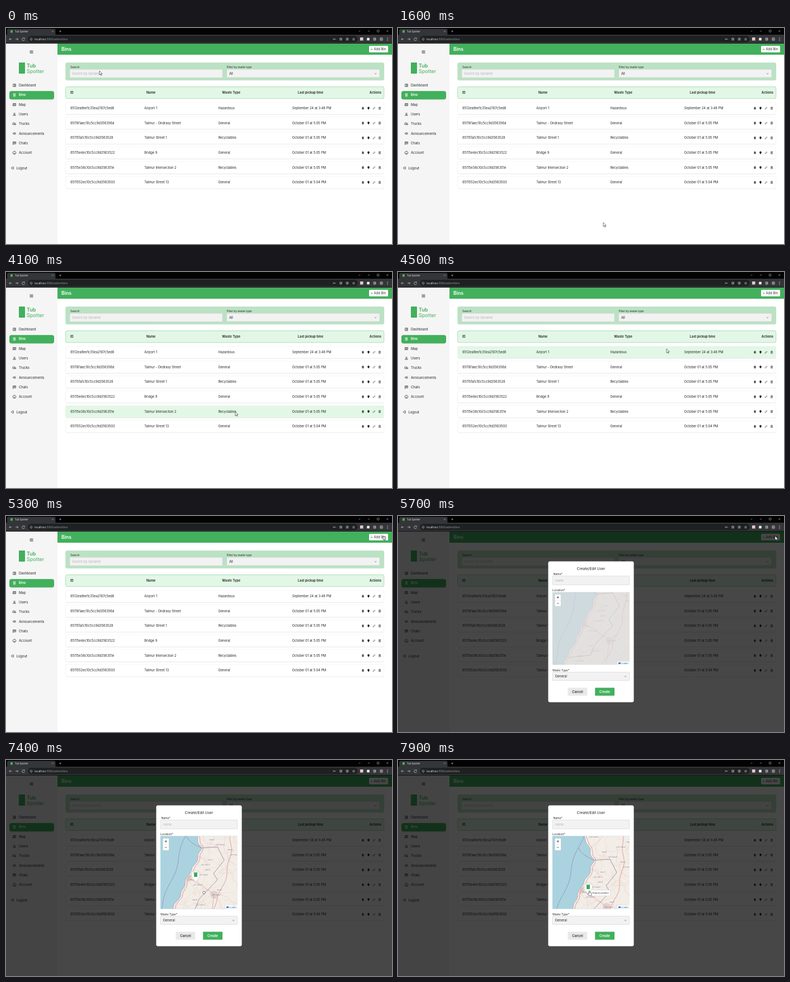
An HTML page for the animation above (8000 ms loop, 690 by 388 pixels).

```html
<!DOCTYPE html>
<html lang="en">
<head>
<meta charset="utf-8">
<title>Bins</title>
<style>
html, body { margin: 0; width: 100%; height: 100%; overflow: hidden; background: #fff; }
svg { display: block; width: 100vw; height: 100vh; font-family: Inter, sans-serif; }
text { white-space: pre; }
.os { font-family: "Open Sans", sans-serif; }
.arial { font-family: "Liberation Sans", Arial, sans-serif; }
.arabic { font-family: "DejaVu Sans", sans-serif; }
</style>
</head>
<body>
<svg id="stage" viewBox="0 0 690 388"></svg>
<script>
const GREEN = '#42b05c', INK = '#222', GREY = '#b5b5b5', PALE = '#ddd';
const STEP = 100, LOOP = 8000;

const text = (x, y, s, size = 5.75, fill = INK, attrs = '') =>
  `<text x="${x}" y="${y}" font-size="${size}" fill="${fill}" ${attrs}>${s}</text>`;
const bold = (x, y, s, size, fill, attrs = '') => text(x, y, s, size, fill, 'font-weight="600" ' + attrs);
const rect = (x, y, w, h, fill, rx = 0, attrs = '') =>
  `<rect x="${x}" y="${y}" width="${w}" height="${h}" rx="${rx}" fill="${fill}" ${attrs}/>`;
const line = (d, stroke, width = .7) => `<path d="${d}" fill="none" stroke="${stroke}" stroke-width="${width}"/>`;
const dot = (x, y, r, fill) => `<circle cx="${x}" cy="${y}" r="${r}" fill="${fill}"/>`;
const border = (color, width = .5) => `stroke="${color}" stroke-width="${width}"`;
const CENTER = 'text-anchor="middle"';

// Icons live on a 24-unit grid and are placed by their centre.
const ICONS = {
  board: 'M4 4h16v16H4zM12 4v16M12 12h8',
  bin: 'M4 6h16M9 6V3h6v3M6 6v15h12V6M10 10v7M14 10v7',
  map: 'M3 6l6-2 6 2 6-2v14l-6 2-6-2-6 2zM9 4v14M15 6v14',
  user: 'M12 4a4 4 0 1 0 .01 0M4 20c0-8 16-8 16 0z',
  truck: 'M2 6h12v10H2zM14 9h4l4 4v3h-8M6 16v3M18 16v3',
  horn: 'M4 9v6h5l6 4V5L9 9zM20 8v8',
  chat: 'M3 4h18v13H8l-5 4zM7 8h10M7 12h10',
  account: 'M12 2a10 10 0 1 0 .01 0M12 7v4M7 17h10',
  logout: 'M9 4h11v16H9M15 12H3M7 8l-4 4 4 4',
  pin: 'M12 22S5 15 5 9a7 7 0 0 1 14 0c0 6-7 13-7 13z',
  pencil: 'M4 20l1-5L16 4l4 4L9 19z',
  key: 'M7 8a4 4 0 1 0 .01 0M11 12h11v4',
  star: 'M12 3l3 6 6 1-5 5 1 6-5-3-5 3 1-6-5-5 6-1z',
  down: 'M5 9l7 7 7-7',
  box: 'M4 4h16v16H4z',
  minus: 'M4 12h16',
  plus: 'M12 4v16M4 12h16',
  cross: 'M5 5l14 14M19 5L5 19',
  back: 'M21 12H4M11 5l-7 7 7 7',
  reload: 'M19 7a9 9 0 1 0 2 7M20 2v6h-6'
};
const icon = (name, x, y, size, color, fill = 'none') =>
  `<path d="${ICONS[name]}" transform="translate(${x - size / 2} ${y - size / 2}) scale(${size / 24})"
    fill="${fill}" stroke="${color}" stroke-width="2.4"/>`;
const iconRow = (names, x, gap, y, size) => names.map((name, i) => icon(name, x + i * gap, y, size, PALE)).join('');

function browser() {
  return rect(0, 0, 690, 28, '#030303') + rect(2, 1.5, 86.5, 14, '#343538', 2.5) +
    rect(0, 12, 690, 15.5, '#343538') + rect(39, 14, 590, 11.5, '#1f2022', 5.7) +
    rect(8, 4, 4, 4.5, GREEN) + text(16, 8, 'Tub Spotter', 4.4, '#e8e8e8', 'class="os"') +
    icon('cross', 83.5, 6, 4.5, PALE) + icon('plus', 97, 6, 5.5, PALE) +
    iconRow(['down', 'minus', 'box', 'cross'], 632, 16.6, 5.5, 5) +
    icon('back', 8, 20, 6.5, PALE) + icon('back', 19.5, 20, -6.5, PALE) +
    icon('reload', 31, 20, 6.5, PALE) + icon('account', 45, 20, 5, PALE) +
    text(51, 21.7, 'localhost<tspan fill="#9aa0a6">:3000/admin/bins</tspan>', 4.8, '#eee', 'class="os"') +
    iconRow(['key', 'board', 'board', 'star'], 587, 11.5, 20, 5.5) +
    rect(633, 17, 5.5, 5.5, '#e6c9c9') + icon('box', 647.5, 20, 6, '#eee', '#eee') +
    icon('board', 659, 20, 6, '#eee') + dot(671, 20, 3.2, '#837b80') +
    [-1, 0, 1].map(i => dot(682, 20 + i * 2.4, .65, PALE)).join('');
}

function sidebar() {
  const items = { board: 'Dashboard', bin: 'Bins', map: 'Map', user: 'Users',
    truck: 'Trucks', horn: 'Announcements', chat: 'Chats', account: 'Account' };
  return rect(0, 27.5, 92, 361, '#f5f5f5') +
    line('M42.5 41h6m-6 2h6m-6 2h6', INK, .8) + rect(23, 62, 11, 20, GREEN, 1) +
    bold(37, 70.5, 'Tub', 9, GREEN) + text(37, 81, 'Spotter', 9, GREEN) +
    rect(6, 113.3, 80, 15, GREEN, 4, 'filter="url(#soft)"') +
    Object.entries(items).map(([name, label], i) => {
      const y = 103 + i * 17.3, on = label === 'Bins', color = on ? '#fff' : INK;
      return icon(name, 15, y, 6.8, color) + (on ? bold : text)(23, y + 2.1, label, 5.9, color);
    }).join('') +
    icon('logout', 11.5, 251.5, 6, INK) + text(18.5, 253.6, 'Logout', 5.9);
}

const ROWS = [
  ['6512ea9ee1c35ea2107c5ed8', 'Airport 1', 'Hazardous', 'September 24 at 3:48 PM'],
  ['651181aec10c5cc9d356356d', 'Talmur - Ondrasy Street', 'General', 'October 01 at 5:05 PM'],
  ['65115fa1c10c5cc9d3563528', 'Talmur Street 1', 'Recyclables', 'October 01 at 5:05 PM'],
  ['65115e4ec10c5cc9d3563522', 'Bridge 9', 'General', 'October 01 at 5:05 PM'],
  ['65115e38c10c5cc9d356351e', 'Talmur Intersection 2', 'Recyclables', 'October 01 at 5:05 PM'],
  ['6511552ec10c5cc9d3563503', 'Talmur Street 13', 'General', 'October 01 at 5:04 PM']
];
const rowTop = i => 133.4 + i * 26.65, ROW_H = 21.4;

function table() {
  const heads = ['Name', 'Waste Type', 'Last pickup time'];
  return rect(106.7, 105.6, 569, 21, '#e2f7e6', 2, border('#86cb98', .6)) +
    bold(115, 118, 'ID', 5.75) + bold(671, 118, 'Actions', 5.75, INK, 'text-anchor="end"') +
    heads.map((s, i) => bold(251 + i * 135.3, 118, s, 5.75)).join('') +
    ROWS.map((cells, i) => {
      const y = rowTop(i) + 10.7;
      return rect(106.7, rowTop(i), 569, ROW_H, '#fff', 2, `class="row" filter="url(#soft)" ${border('#e9eeea', .4)}`) +
        cells.map((s, c) => text(115.2 + c * 132.1, y + 2, s)).join('') +
        icon('bin', 638, y, 5.2, '#333', '#777') + icon('pin', 648, y, 5.4, INK, INK) +
        icon('pencil', 658, y, 5.6, '#333') + icon('bin', 668, y, 5.8, '#333');
    }).join('');
}

const field = (x, y, w, h) => rect(x, y, w, h, '#f2f2f2', 1, border('#c9c9c9'));

function page() {
  return rect(92, 27.5, 598, 20.5, GREEN) + bold(99, 41, 'Bins', 8.7, '#fff') +
    rect(649, 32, 34, 11.7, '#fff', 1.5) + text(652, 40, '+ Add Bin', 5.9, '#333') +
    rect(106.7, 62.5, 569, 31.3, '#bbe2c4', 2.5, border('#a8d5b3')) +
    text(115, 72, 'Search', 4.95) + text(394.5, 72.4, 'Filter by waste type', 4.85) +
    field(114, 74.3, 273, 15) + field(394.5, 74.3, 273.5, 14.6) +
    text(118, 84, 'Search by id/name', 5.8, GREY) + text(399, 83.7, 'All') +
    icon('down', 660.5, 81.8, 5.5, INK) + table();
}

function mapArt() {
  let seed = 11;
  const rnd = (a, b) => a + (b - a) * ((seed = seed * 16807 % 2147483647) / 2147483647);
  const TOP = 100, BOTTOM = 300;
  const coast = y => 350 - .47 * Math.abs(y - 158) + 1.5 * Math.sin(y / 3.5) + 1.5 * Math.sin(y / 9);
  const seaBorder = y => 322 - .335 * (y - 136) + 3 * Math.sin(y / 14);
  const curve = (fx, gap) => {
    let d = '';
    for (let y = TOP; y <= BOTTOM; y += gap) d += `${d ? 'L' : 'M'}${fx(y).toFixed(1)} ${y}`;
    return d;
  };
  const walk = (x, y, angle, steps) => {
    let d = `M${x} ${y}`;
    for (let k = 0; k < steps; k++) {
      angle += rnd(-.7, .7);
      d += `l${(4 * Math.cos(angle)).toFixed(1)} ${(4 * Math.sin(angle)).toFixed(1)}`;
    }
    return d;
  };
  const shore = curve(coast, 2);

  let roads = '', labels = '';
  for (let i = 0; i < 150; i++)
    roads += line(walk(rnd(290, 430), rnd(TOP, BOTTOM), rnd(0, 6.3), 9), ['#eed0b5', '#e9b5b0', '#dcd0cc', '#e8ddd0'][i % 4], .4);
  for (let y = TOP + 8; y < BOTTOM; y += 9)
    labels += text(coast(y) + rnd(12, 80), y, y % 2 ? 'المنطقة الأولى' : 'المنطقة', 2.8, '#806b92', `class="arabic" ${CENTER}`);

  return rect(240, 90, 200, 220, '#aad3df') +
    `<clipPath id="land"><path d="${shore}H450V${TOP}z"/></clipPath><g clip-path="url(#land)">` +
    rect(240, 90, 220, 220, '#f2ede7') + dot(326, 212, 6, '#ddd3d1') + dot(372, 242, 7, '#ddd3d1') + roads +
    line(curve(y => coast(y) + 4, 7), '#df7f86', .7) +
    line(curve(y => 402 - .0022 * (y - 145) ** 2 + 2 * Math.sin(y / 8), 7), '#df7f86', .7) +
    line('M326 212L350 225 372 242 364 300', '#e08e84', .6) + '</g>' +
    line(shore, '#9b8fae', .6) + line(curve(seaBorder, 4), '#8f86b0', .7) +
    line('M322 136Q327 149 350 158L378 156 390 180 371 204 378 215 345 250 338 268 300 272', '#a793ac', 1) + labels;
}

function modal() {
  return rect(0, 27.5, 690, 361, '#000', 0, 'opacity=".72"') +
    rect(268.5, 81.5, 153, 253, '#fff', 3) +
    text(345, 96.7, 'Create/Edit User', 6.5, INK, CENTER) +
    text(277.5, 106, 'Name*', 5) + field(276.2, 107.7, 137.6, 16) + text(281, 117.5, 'name', 5.75, GREY) +
    text(276, 134.7, 'Location*', 5) +
    `<g clip-path="url(#mapBox)">${rect(276, 136.5, 138, 131, PALE)}<g id="map">${mapArt()}</g>
      <g id="marker"><path d="M0 0C-3-6-7.5-9-7.5-14a7.5 7.5 0 0 1 15 0C7.5-9 3-6 0 0z" fill="#fff" ${border('#aaa', .4)}/>
      ${rect(-3, -17.5, 6, 7.5, GREEN, .7)}${line('M-3.8-18H3.8M-1-16v4.5M1-16v4.5', '#2d9650')}</g></g>` +
    rect(280.2, 140.6, 11.3, 22, '#fff', 1.4, border(GREY)) + line('M280.2 151.6h11.3', '#ccc', .4) +
    icon('plus', 285.8, 146.2, 6.5, '#111') + icon('minus', 285.8, 157, 6, '#111') +
    rect(392, 261.6, 22, 5.8, '#fff', 0, 'opacity=".8"') + rect(394, 263, 4, 3, '#4c7be1') +
    text(399, 266, 'Leaflet', 4.2, '#0078a8', 'class="arial"') +
    text(276, 279, 'Waste Type*', 5) + field(276.2, 280.5, 137.6, 15) + text(280.7, 290, 'General') +
    icon('down', 406.5, 288, 5.5, INK) +
    rect(303.5, 308.6, 34.8, 14.2, '#e9e9e9', 1) + text(321, 317.8, 'Cancel', 5.9, INK, CENTER + ' font-weight="500"') +
    rect(352.2, 308.6, 34.8, 14.2, GREEN, 1) + bold(369.6, 317.8, 'Create', 5.9, '#fff', CENTER);
}

const skin = border(INK, .6) + ' fill="#fff" stroke-linejoin="round"';
const cursors =
  `<g id="tip">${rect(2.5, -4.5, 35, 10.5, '#fff', 1, border('#bbb', .4))}${text(5.4, 2.2, 'Drag to position', 4.2, INK, 'class="arial"')}</g>
   <path id="arrow" d="M0 0V7.2L1.7 5.6 2.8 8.2 4 7.7 2.9 5.2H5.2z" ${skin}/>
   <circle id="fist" r="2.3" ${skin}/>
   <path id="hand" d="M-.9-2.5q.9-1.1 1.8 0V.3q2.6.1 3 1.3V4q-.5 1.4-1 1.9H-.6L-3 2.4q.4-1.2 2.1 0z" ${skin}/>`;

const stage = document.getElementById('stage');
stage.innerHTML = `<defs>
  <filter id="soft" x="-5%" y="-20%" width="110%" height="150%"><feDropShadow dx="0" dy=".5" stdDeviation=".6" flood-opacity=".16"/></filter>
  <clipPath id="mapBox">${rect(276, 136.5, 138, 131, '#000')}</clipPath></defs>` +
  rect(0, 0, 690, 388, '#fff') + page() + sidebar() + browser() +
  `<g id="modal">${modal()}</g><g id="cursor">${cursors}</g>`;

const el = Object.fromEntries([...stage.querySelectorAll('[id]')].map(n => [n.id, n]));
const rows = [...stage.querySelectorAll('.row')];

// The pointer rests between moves; bend pushes the middle of a move off its straight line.
const HOME = [167, 77];
const MOVES = [
  { from: 0, to: 400, end: [434, 338], bend: [0, -25] },
  { from: 600, to: 1600, end: [367, 349.5], bend: [0, -65] },
  { from: 3600, to: 4500, end: [480, 138], bend: [-10, 0] },
  { from: 4500, to: 5300, end: [674, 36], bend: [0, 0] },
  { from: 5700, to: 6400, end: [360, 220], bend: [0, 0] },
  { from: 6500, to: 7400, end: [354, 238], bend: [0, 0] },
  { from: 7400, to: 7600, end: [355, 260], bend: [0, 0] },
  { from: 7600, to: 7800, end: [342, 238], bend: [0, 0] }
];
const OPEN = 5700, GRAB = 6500, DROP = 7600, POINT = 7800;
const clamp = (v, lo, hi) => Math.min(hi, Math.max(lo, v));

function pointer(t) {
  let pos = HOME;
  for (const { from, to, end, bend } of MOVES) {
    const p = clamp((t - from) / (to - from), 0, 1);
    pos = pos.map((v, k) => v + (end[k] - v) * p ** 1.3 + bend[k] * Math.sin(Math.PI * p));
  }
  return pos;
}
const show = (node, on) => { node.style.display = on ? '' : 'none'; };
const move = (node, x, y) => node.setAttribute('transform', `translate(${x} ${y})`);

function draw(t) {
  const [x, y] = pointer(t), open = t >= OPEN;
  rows.forEach((row, i) => {
    const over = !open && y >= rowTop(i) && y <= rowTop(i) + ROW_H;
    row.setAttribute('fill', over ? '#e2f7e6' : '#fff');
  });
  move(el.cursor, x, y);
  const grabbing = t >= GRAB && t <= DROP, pointing = t >= POINT;
  show(el.arrow, !grabbing && !pointing);
  show(el.fist, grabbing);
  show(el.hand, pointing);
  show(el.tip, pointing);
  show(el.modal, open);

  // The map and its marker follow the pointer while it drags.
  const [dragX, dragY] = pointer(clamp(t, GRAB, DROP));
  move(el.map, dragX - 354, dragY - 238);
  move(el.marker, dragX - 15, dragY - 18);
  el.map.setAttribute('opacity', clamp(.28 + (t - OPEN) / 280, 0, 1));
  show(el.marker, t > OPEN);
}

const start = performance.now();
function frame() {
  const t = (performance.now() - start) % LOOP;
  draw(Math.floor(t / STEP) * STEP);
  requestAnimationFrame(frame);
}
frame();
</script>
</body>
</html>
```
